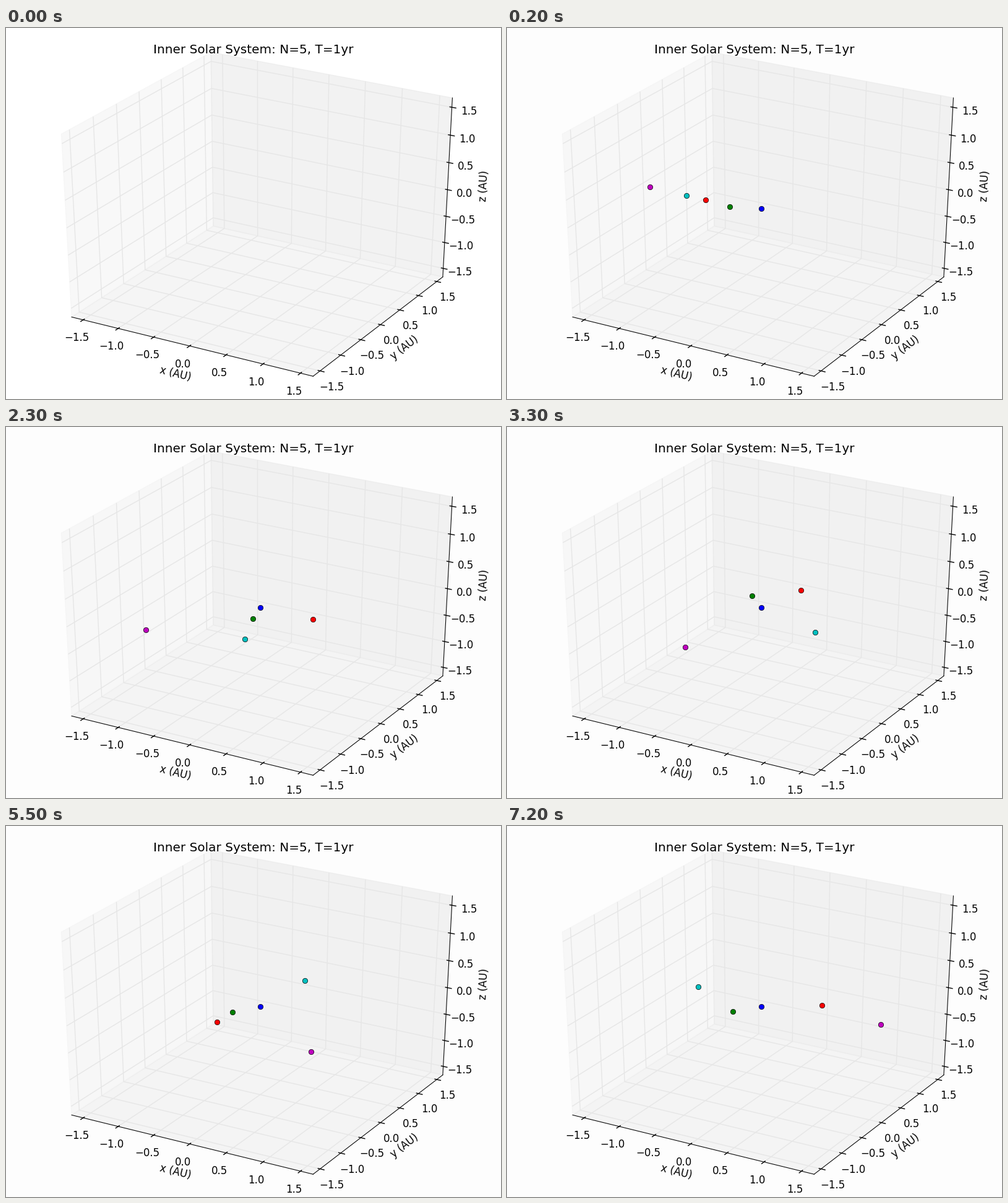
A matplotlib script for the animation above (7.3 s loop, 800 by 600 pixels).

```python
import numpy as np
import matplotlib.pyplot as plt
from matplotlib.animation import FuncAnimation
from matplotlib.collections import LineCollection
from matplotlib.patches import Polygon, Rectangle

plt.rcParams.update({
    "font.family": "DejaVu Sans",
    "text.kerning_factor": 6,
    "toolbar": "None",
})

FRAMES, INTERVAL = 73, 100
DAYS_PER_FRAME = 5

LIMIT = 1.6                # half range of each axis, AU
EDGE = LIMIT * 25 / 24     # walls sit slightly outside the limits
STEP = 2 * LIMIT / 12
TICKS = np.arange(-1.5, 1.6, 0.5)
PER_POINT = 48 / 1008      # label offset per point, in steps

ELEV, AZIM, DIST = np.radians(30), np.radians(-60), 10
TOWARD = np.array([np.cos(AZIM) * np.cos(ELEV),
                   np.sin(AZIM) * np.cos(ELEV), np.sin(ELEV)])
RIGHT = np.array([-np.sin(AZIM), np.cos(AZIM), 0])
UP = np.cross(TOWARD, RIGHT)

GM = 0.01720209895 ** 2            # AU^3 / day^2
KM_S = 86400 / 1.495978707e8       # km/s in AU/day
# colour, distance in AU, starting speed in km/s
PLANETS = [("g", 0.387, 47.362), ("r", 0.723, 35.02),
           ("c", 1.0, 29.785), ("m", 1.524, 24.077)]


def project(points):
    """Perspective view of points in AU, last axis x, y, z."""
    q = np.asarray(points, float) / (2 * LIMIT)
    depth = DIST - q @ TOWARD
    return np.stack([q @ RIGHT / depth, q @ UP / depth], axis=-1)


def with_value(base, i, value):
    point = np.array(base, float)
    point[i] = value
    return point


def outward(base, i, steps):
    """Shift a point away from the centre in all directions but i."""
    move = np.sign(base) * steps * STEP
    move[i] = 0
    return base + move


def orbit(radius, speed):
    """Positions at every frame, integrated in steps of one day."""
    pos = np.array([-radius, 0.0, 0.0])
    vel = np.array([0.0, -speed * KM_S, 0.0])
    path = [pos.copy()]
    for day in range(1, DAYS_PER_FRAME * FRAMES):
        vel -= GM * pos / np.linalg.norm(pos) ** 3
        pos += vel
        if day % DAYS_PER_FRAME == 0:
            path.append(pos.copy())
    return project(path)


fig = plt.figure(figsize=(8, 6), dpi=100, facecolor="white")
ax = fig.add_axes([0, 0, 1, 1])
ax.set_axis_off()
ax.set_xlim(-0.095, 0.09)
ax.set_ylim(-0.095, 0.09)

backdrop = ax.add_patch(Rectangle((0, 0), 1, 1, transform=ax.transAxes,
                                  lw=0, zorder=0))

# Walls: left, back, floor
E = EDGE
WALLS = [
    (0.95, [(-E, -E, -E), (-E, E, -E), (-E, E, E), (-E, -E, E)]),
    (0.90, [(-E, E, -E), (E, E, -E), (E, E, E), (-E, E, E)]),
    (0.925, [(-E, -E, -E), (E, -E, -E), (E, E, -E), (-E, E, -E)]),
]
walls = [(ax.add_patch(Polygon(project(corners), lw=1, zorder=1)), shade)
         for shade, corners in WALLS]

# Grid lines run over two walls, bending where the walls meet
CORNER = np.array([-E, E, -E])
bends = []
for i in range(3):
    for t in TICKS:
        mid = with_value(CORNER, i, t)
        j, k = (i + 1) % 3, (i + 2) % 3
        bends.append(project([with_value(mid, j, -mid[j]), mid,
                              with_value(mid, k, -mid[k])]))
grid = ax.add_collection(LineCollection(bends, linewidths=1, zorder=2),
                         autolim=False)


def draw_axis(name, i, base, tick_dir):
    base = np.array(base, float)
    ends = project([with_value(base, i, -E), with_value(base, i, E)])
    ax.plot(*ends.T, color="k", lw=0.75, zorder=3)

    sign = np.sign(base[tick_dir])
    for t in TICKS:
        at = with_value(base, i, t)
        mark = [with_value(at, tick_dir, base[tick_dir] + sign * s * STEP)
                for s in (-0.1, 0.2)]
        ax.plot(*project(mark).T, color="k", lw=1, zorder=3)
        ax.text(*project(outward(at, i, 12 * PER_POINT)),
                f"{t:.1f}".replace("-", "\u2212"),
                size=12, ha="center", va="top", zorder=4)

    dx, dy = (ends[1] - ends[0]) * (800, 600)
    ax.text(*project(outward(base, i, 26 * PER_POINT)), f"{name} (AU)",
            size=12, ha="center", va="center",
            rotation=np.degrees(np.arctan2(dy, dx)), zorder=4)


draw_axis("x", 0, (0, -E, -E), 1)
draw_axis("y", 1, (E, 0, -E), 0)
draw_axis("z", 2, (E, E, 0), 0)

fig.text(0.5, 0.92 + 5 / 72 / 6, "Inner Solar System: N=5, T=1yr",
         size=14.4, ha="center", va="baseline")

paths = [("b", project(np.zeros((FRAMES, 3))))]
paths += [(color, orbit(radius, speed)) for color, radius, speed in PLANETS]
bodies = [(ax.plot([], [], "o", ms=6, mec="k", mew=0.5, zorder=5)[0],
           color, path) for color, path in paths]


def paint(background, dark):
    backdrop.set_facecolor(background)
    for wall, shade in walls:
        wall.set_color((0.245,) * 3 if dark else (shade,) * 3)
        wall.set_alpha(0.5)
    grid.set_color("#3d3d3d" if dark else "#e6e6e6")
    for dot, color, _ in bodies:
        dim = "#161616" if color == "g" else "#2b2b2b"
        dot.set_markerfacecolor(dim if dark else color)


def update(frame):
    dark = frame == 1      # a single dimmed flash as the bodies appear
    paint("white" if frame == 0 else "#404040" if dark else "#fdfdfd", dark)
    for dot, _, path in bodies:
        if frame == 0:
            dot.set_data([], [])
        else:
            x, y = path[frame - 1]
            dot.set_data([x], [y])


anim = FuncAnimation(fig, update, frames=FRAMES, interval=INTERVAL,
                     repeat=True, repeat_delay=0)
plt.show()
```
